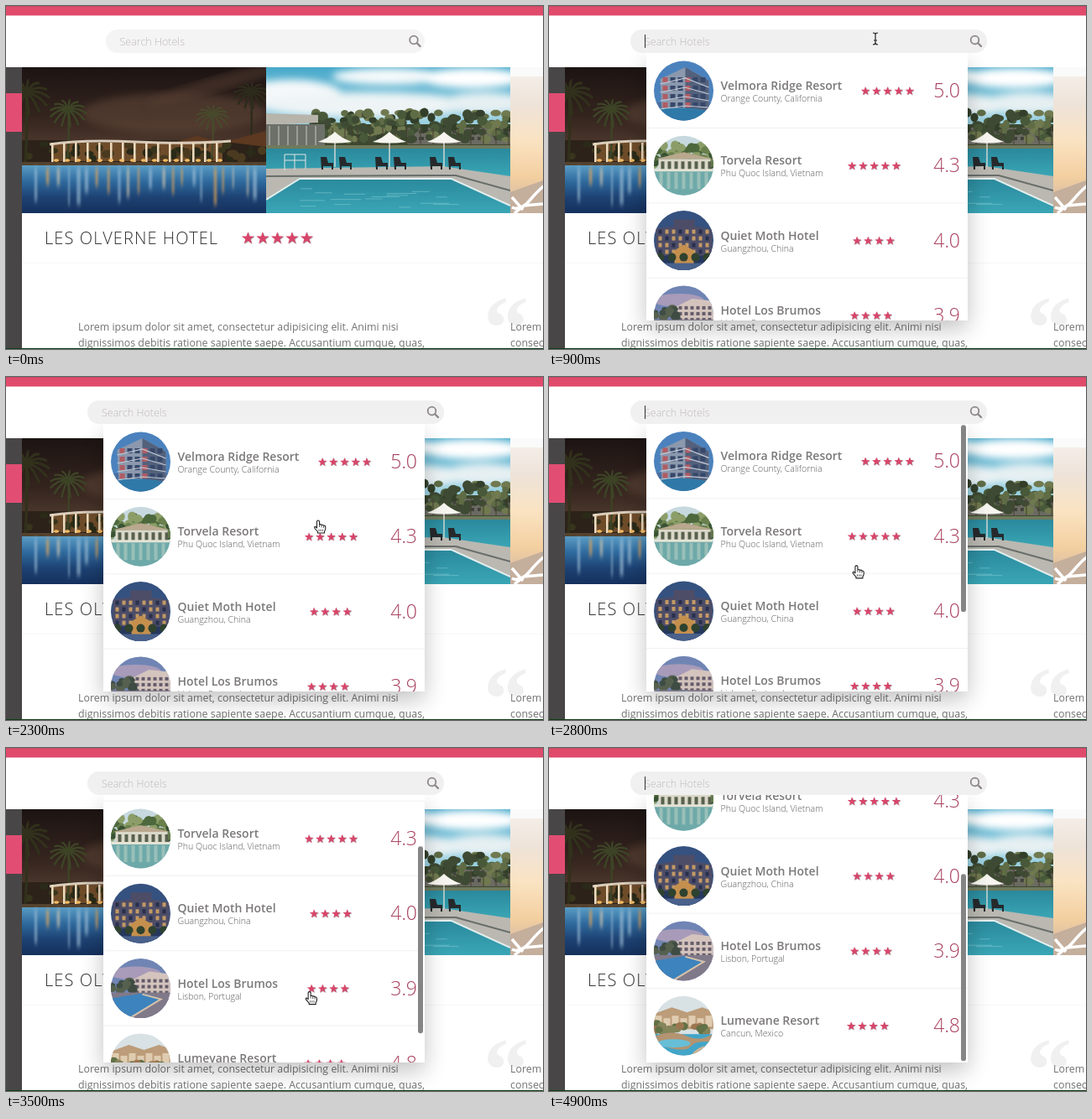
An HTML page that plays this animation: 640x409 px, repeating every 5 s.

```html
<!DOCTYPE html>
<html lang="en">
<head>
<meta charset="utf-8">
<title>Hotel search</title>
<style>
html, body { margin: 0; width: 100%; height: 100%; overflow: hidden; background: #fff; }
svg { display: block; width: 100%; height: 100%; font-family: "Open Sans", "Noto Sans", sans-serif; }
.light { font-weight: 300; }
.title { font-size: 14px; font-weight: 600; fill: #7b7879; }
.place { font-size: 10.6px; font-weight: 300; fill: #5f5c5d; }
.score { font-size: 23px; font-weight: 300; fill: #a83f5e; text-anchor: end; }
.body { font-size: 12.4px; fill: #737172; }
.quote { font: bold 108px "Liberation Serif", serif; fill: #f1f0f1; }
</style>
</head>
<body>
<svg id="stage" viewBox="0 0 640 409"></svg>
<script>
const R = (x, y, w, h, fill, more = '') => `<rect x="${x}" y="${y}" width="${w}" height="${h}" fill="${fill}" ${more}/>`;
const E = (x, y, rx, ry, fill, more = '') => `<ellipse cx="${x}" cy="${y}" rx="${rx}" ry="${ry}" fill="${fill}" ${more}/>`;
const P = (d, fill, more = '') => `<path d="${d}" fill="${fill}" ${more}/>`;
const L = (d, color, w = 1, more = '') => `<path d="${d}" fill="none" stroke="${color}" stroke-width="${w}" ${more}/>`;
const T = (x, y, cls, text, more = '') => `<text x="${x}" y="${y}" class="${cls}" ${more}>${text}</text>`;
const rep = (n, f) => Array.from({ length: n }, (_, i) => f(i)).join('');
const grad = (id, ...colors) => `<linearGradient id="${id}" x2="0" y2="1">${
  colors.map((c, i) => `<stop offset="${i / (colors.length - 1)}" stop-color="${c}"/>`).join('')}</linearGradient>`;
const clip = (id, shape) => `<clipPath id="${id}">${shape}</clipPath>`;

let seed = 7;
const rnd = (a, b) => a + (b - a) * ((seed = (seed * 16807) % 2147483647) / 2147483647);
const pick = list => list[Math.floor(rnd(0, list.length))];

function star(cx, cy, r, fill) {
  const pts = rep(10, i => {
    const a = i * Math.PI / 5, q = i % 2 ? r * .4 : r;
    return `${(cx + q * Math.sin(a)).toFixed(1)},${(cy - q * Math.cos(a)).toFixed(1)} `;
  });
  return `<polygon points="${pts}" fill="${fill}"/>`;
}
const stars = (n, x, y, r, step) => rep(n, i =>
  star(x + i * step + .8, y + .6, r, '#a99aa0') + star(x + i * step, y, r, '#d9456a'));

function palm(x, y, r, ground, color) {
  return L(`M${x} ${y}Q${x + 2} ${(y + ground) / 2} ${x - 1} ${ground}`, color, r / 9) + rep(13, i => {
    const a = i * Math.PI * 2 / 13, ex = x + r * Math.cos(a), ey = y + r * (.75 * Math.sin(a) + .2);
    return L(`M${x} ${y}Q${(x + ex) / 2} ${(y + ey) / 2 - r * .3} ${ex} ${ey}`, color, r / 9);
  });
}
const foliage = (n, x0, x1, y0, y1, size, colors) => rep(n, () =>
  E(rnd(x0, x1), rnd(y0, y1), rnd(.6, 1) * size, rnd(.5, .9) * size, pick(colors)));

function nightPool() {
  return R(19, 73, 291, 174, 'url(#night)') +
    E(200, 128, 110, 24, '#6d5140', 'opacity=".45" filter="url(#soft)"') +
    E(255, 92, 90, 9, '#5a4035', 'opacity=".5" filter="url(#soft)" transform="rotate(-16 255 92)"') +
    R(19, 160, 291, 30, '#2c2219') + R(54, 163, 204, 22, '#8a5f33', 'opacity=".7"') +
    foliage(40, 19, 310, 164, 182, 7, ['#2a2a18', '#38351d', '#4a3a20']) +
    palm(74, 124, 22, 185, '#3d4426') + palm(246, 130, 20, 183, '#48492c') +
    palm(292, 103, 21, 180, '#2d2c1c') + palm(24, 104, 28, 186, '#31311c') +
    P('M200 163L228 155L256 163ZM262 162L310 149V168Z', '#5c3920') +
    L('M52 165Q90 159 155 162T268 161', '#d9cbb9', 3) +
    rep(15, i => R(54 + i * 14, 163, 2.6, 23, '#ecd9bd')) +
    rep(16, i => E(60 + i * 13, 184, 3, 1.8, '#f2b860')) +
    R(19, 186, 291, 4, '#54422e') + R(19, 190, 291, 57, 'url(#water)') +
    '<g filter="url(#blurY)">' + rep(22, i =>
      R(34 + i * 12.5 + rnd(-3, 3), 193, rnd(2, 5), rnd(20, 46), pick(['#e8a656', '#d6c8ae', '#9fc0d8']), 'opacity=".6"')) + '</g>';
}

function dayPool() {
  return R(310, 73, 291, 174, 'url(#day)') +
    '<g filter="url(#soft)">' + E(455, 84, 66, 10, '#f6fafb') + E(340, 106, 60, 18, '#f4f8f9') +
    E(555, 86, 60, 12, '#fff') + E(430, 118, 130, 15, '#eef4f6') + E(570, 116, 50, 13, '#e6f0f3') + '</g>' +
    R(370, 141, 231, 29, '#3d472f') + R(478, 145, 123, 20, '#6b6a62') +
    rep(12, i => R(482 + i * 10, 148, 6, 4, '#45473f') + R(482 + i * 10, 156, 6, 4, '#3f423b')) +
    foliage(190, 366, 601, 127, 160, 6.5, ['#48593a', '#5f6c45', '#333f2a', '#70794f', '#3e4a33']) +
    rep(16, i => L(`M${374 + i * 15} 145v23`, '#4b4736', 1.2)) +
    P('M310 128L372 130V139L310 142Z', '#b7b4ac') + R(310, 141, 70, 27, '#6c7069') +
    rep(6, i => R(313 + i * 11, 143, 2, 24, '#9a9d96')) +
    R(310, 166, 291, 5, '#6f7a5c') + R(310, 170, 291, 34, 'url(#teal)') +
    P('M310 194L520 191L601 203V247H310Z', '#bab8b1') +
    L('M310 203L536 202L601 220', '#686e6a', 2) +
    P('M310 230L350 205H531L601 238V247H310Z', 'url(#teal)') +
    L('M310 231L350 206H531L601 238', '#e5efee', 2) +
    L('M332 196V177H357V194M332 184H357M344 177V195', '#dfe5e3', 1) +
    [392, 457, 522].map(x => L(`M${x} 160V192`, '#e7e5df', 1.3) +
      P(`M${x - 20} 162Q${x - 7} 157 ${x} 150Q${x + 7} 157 ${x + 20} 162Q${x} 165 ${x - 20} 162Z`, '#f7f5ef') +
      [-13, 9].map(d => P(`M${x + d - 4} 180h7l2 7h6v8h-2v-4h-10v4h-2Z`, '#26292c')).join('')).join('') +
    rep(16, () => R(rnd(350, 520), rnd(212, 244), rnd(12, 40), 1, '#a0dce2', 'opacity=".4"'));
}

function sunsetDeck() {
  return R(601, 73, 39, 174, 'url(#peach)') + R(601, 73, 39, 11, '#fbfafa') +
    P('M601 222L640 208V247H601Z', '#c4ae9c') +
    L('M603 240Q613 245 624 232T642 214M606 247L617 238L640 236M603 228L616 243', '#fff', 3.5);
}

// Round thumbnails, centred on 0,0
const thumbs = [
  R(-36, -36, 72, 72, '#4b82bd') + R(-36, 14, 72, 22, '#4b6f9e') + P('M-28 -14L2 -28L30 -12V23L-26 24Z', '#8b98ad') +
    P('M2 -28L30 -12V23L2 24Z', '#53617c') +
    rep(24, i => R(-25 + i % 6 * 9, -16 + Math.floor(i / 6) * 10, 6, 6, i % 3 ? '#37486a' : '#b15c63')) +
    rep(4, i => L(`M-28 ${-8 + i * 10}L2 ${-15 + i * 11}L30 ${-4 + i * 8}`, '#c3c9d6', 1.2)) + P('M-36 24Q0 16 36 26V36H-36Z', '#2f79a9'),
  R(-36, -36, 72, 72, '#c7d9df') + foliage(70, -36, 36, -26, 2, 7, ['#4d683c', '#69804d', '#8c9d68', '#385234']) +
    R(-30, -8, 62, 13, '#dad8c9') + P('M-33 -8L0 -16L35 -8Z', '#b9a88e') +
    rep(8, i => R(-27 + i * 8, -5, 4, 10, '#59614e')) + R(-36, 5, 72, 32, '#6ea9a9') +
    rep(7, i => R(-29 + i * 9, 8, 4, 20, '#b6cfc4', 'opacity=".6"')) + R(-36, 4, 72, 3, '#e4e4d6'),
  R(-36, -36, 72, 72, '#35517f') + P('M-33 -14L-12 -17V-25H13V-17L34 -13V22H-33Z', '#4d4d68') +
    rep(32, i => R(-30 + i % 8 * 8, -13 + Math.floor(i / 8) * 8, 4, 5, i % 3 ? '#c39a65' : '#28304d')) +
    R(-36, 18, 72, 18, '#26385e') + P('M-11 30V12L0 5L12 12V30Z', '#c58f4d') + R(-36, 27, 72, 10, '#49618b') +
    rep(5, i => E(-28 + i * 14, 20, 5, 5, '#2f422f')),
  R(-36, -36, 72, 72, '#7085b4') + E(-6, -18, 30, 8, '#a89bb9') + P('M-10 -10L10 -20L36 -17V12H-10Z', '#d4c4bd') +
    rep(18, i => R(-6 + i % 6 * 7, -11 + Math.floor(i / 6) * 7, 4, 4, '#655c6b')) +
    foliage(14, -36, -8, -10, 4, 6, ['#3e4c43', '#56604e']) + R(-36, 5, 72, 32, '#807989') +
    P('M-36 12L2 6L24 12L-14 36H-36Z', '#3d83bd') + L('M2 7L24 13L-14 36', '#d8c2a9', 2),
  R(-36, -36, 72, 72, '#d8e1e4') + P('M-36 -14L-14 -22L4 -16L22 -22L36 -17V4H-36Z', '#bc9c79') +
    rep(7, i => R(-34 + i * 10, -12 + i % 2 * 3, 8, 13, '#dfccb0')) +
    foliage(24, -36, 36, -2, 9, 6, ['#627146', '#84855a', '#9c7650']) + R(-36, 10, 72, 26, '#43a5c8') +
    P('M-36 13Q-14 4 3 12T36 9V20Q16 16 8 25T-36 20Z', '#b49471') + E(-12, 21, 20, 5, '#67bfd7') + P('M8 36Q20 20 36 25V36Z', '#d0b492')
];

const hotels = [
  ['Velmora Ridge Resort', 'Orange County, California', 5, 372, '5.0'],
  ['Torvela Resort', 'Phu Quoc Island, Vietnam', 5, 356, '4.3'],
  ['Quiet Moth Hotel', 'Guangzhou, China', 4, 362, '4.0'],
  ['Hotel Los Brumos', 'Lisbon, Portugal', 4, 359, '3.9'],
  ['Lumevane Resort', 'Cancun, Mexico', 4, 355, '4.8']
];
const rowStep = 89.3;
const row = ([name, place, n, x, score], i) => `<g transform="translate(0 ${i * rowStep})">` +
  `<g transform="translate(160.5 101)"><g clip-path="url(#round)">${thumbs[i]}</g></g>` +
  T(204.5, 100, 'title', name) + T(204.5, 114, 'place', place) +
  stars(n, x + 5, 101.5, 5.5, 13.2) + T(490, 109, 'score', score) + R(116, 145, 383, 1, '#f2f1f2') + '</g>';

const stage = document.getElementById('stage');
stage.innerHTML = '<defs>' +
  grad('night', '#1c1413', '#34241e', '#5d4536', '#33261f') + grad('water', '#5a9cc4', '#2f6a9e', '#1d4273', '#15305c') +
  grad('day', '#48a9cb', '#8ecbdd', '#dfedf0', '#dfedf0') + grad('teal', '#2a899c', '#3aa6b6') +
  grad('peach', '#f6f1ec', '#eee3d9', '#fae3c2', '#f3cfa0', '#c9b3a6') +
  clip('night-box', R(19, 73, 291, 174, '')) + clip('day-box', R(310, 73, 291, 174, '')) +
  clip('deck-box', R(601, 73, 39, 174, '')) + clip('list-box', R(116, 56, 383, 319, '', 'id="listBox"')) +
  clip('round', '<circle r="35.5"/>') +
  '<filter id="soft"><feGaussianBlur stdDeviation="5"/></filter>' +
  '<filter id="blurY"><feGaussianBlur stdDeviation="1 3"/></filter>' +
  '<filter id="shade" x="-30%" y="-30%" width="160%" height="160%"><feGaussianBlur stdDeviation="14"/></filter></defs>' +
  R(0, 0, 640, 409, '#fff') +
  `<g clip-path="url(#night-box)">${nightPool()}</g><g clip-path="url(#day-box)">${dayPool()}</g>` +
  `<g clip-path="url(#deck-box)">${sunsetDeck()}</g>` +
  R(0, 73, 19, 336, '#484647') + R(0, 104, 19, 46, '#e24d73') +
  T(46, 284, 'light', 'LES OLVERNE HOTEL', 'font-size="20" letter-spacing="1.1" fill="#343233"') +
  stars(5, 288.3, 277, 7.8, 17.5) + R(20, 306, 620, 1, '#f8f7f8') +
  T(569, 420, 'quote', '“') +
  T(86, 387, 'body', 'Lorem ipsum dolor sit amet, consectetur adipisicing elit. Animi nisi') +
  T(86, 406, 'body', 'dignissimos debitis ratione sapiente saepe. Accusantium cumque, quas,') +
  T(601, 387, 'body', 'Lorem ipsum') + T(601, 406, 'body', 'consectetur') +
  R(116, 70, 383, 315, '#000', 'id="shadow" filter="url(#shade)"') +
  R(0, 11, 640, 45, '#fff') +
  `<g id="menu" clip-path="url(#list-box)">${R(116, 56, 383, 319, '#fff')}<g id="list">${hotels.map(row).join('')}</g>` +
  R(491, 57, 6, 223, '#868586', 'rx="3" id="thumb"') + '</g>' +
  R(119, 28, 380, 28, '#f5f4f5', 'rx="14" id="field"') +
  T(0, 47, 'light', 'Search Hotels', 'id="hint" font-size="12.5" fill="#bdb9bb"') +
  R(114, 34, 1, 16, '#333', 'id="caret"') +
  `<g id="lens">${L('M4 4L7.5 7.5', '#8d878a', 2.4, 'stroke-linecap="round"')}<circle r="4.8" fill="none" stroke="#8d878a" stroke-width="1.8"/></g>` +
  R(0, 0, 640, 11.4, '#e04b6c') + R(0, 0, 640, .6, '#b54a63') + R(0, 408, 640, 1, '#0d3c14') +
  `<g id="beam">${L('M-3 -7Q0 -7 0 -5V5Q0 7 -3 7M3 -7Q0 -7 0 -5V5Q0 7 3 7M-2 2H2', '#222', 1.2)}</g>` +
  `<g id="hand">${P('M-1.5 1Q0 -1 1.5 1V5Q3 4 4 5.5Q5.5 4.8 6.5 6.2Q8.6 5.8 8.8 8V10Q8.4 12 7.5 13V15H-.5V13.5L-4 9.5Q-5 7.5 -3.2 7.4L-1.5 9Z', '#fff', 'stroke="#222" stroke-width="1.1" stroke-linejoin="round"')}${L('M1.5 5V8M4 6V8.5M6.5 6.5V9M1 10.5V13M3.2 10.5V13M5.4 10.5V13', '#333', .8)}</g>`;

const $ = id => document.getElementById(id);
const set = (id, attrs) => { for (const k in attrs) $(id).setAttribute(k, attrs[k]); };
const show = (id, on) => set(id, { visibility: on ? 'visible' : 'hidden' });
const ease = (t, a, b) => {
  const k = Math.min(1, Math.max(0, (t - a) / (b - a)));
  return k * k * (3 - 2 * k);
};
function along(keys, t, col) {
  let i = 1;
  while (i < keys.length - 1 && t > keys[i][0]) i++;
  const [a, b] = [keys[i - 1], keys[i]];
  const k = Math.min(1, Math.max(0, (t - a[0]) / (b[0] - a[0])));
  return a[col] + (b[col] - a[col]) * k;
}

// time, x, y: a steady drift down through the list and off the stage
const pointer = [[200, 392, -10], [500, 389, 39], [900, 389, 39], [1600, 380, 90],
  [2300, 372, 171], [3200, 362, 268], [4100, 361, 336], [4800, 361, 412]];
const scrollStart = 2750, scrollEnd = 4000, focusTime = 750;

function draw(t) {
  const wide = ease(t, 500, 800), open = ease(t, 550, 900);
  set('field', { x: 119 - 22 * wide, width: 380 + 45 * wide, fill: wide > .5 ? '#f1f0f1' : '#f5f4f5' });
  set('hint', { x: 135.5 - 21.5 * wide });
  set('lens', { transform: `translate(${486 + 21.5 * wide} 40.5)` });
  show('caret', t >= focusTime && (t - focusTime) % 1000 < 500);

  set('listBox', { height: 319 * open });
  set('menu', { opacity: open });
  set('shadow', { height: 315 * open, opacity: .24 * open });
  const offset = 127 * ease(t, scrollStart, scrollEnd);
  set('list', { transform: `translate(0 ${-offset})` });
  set('thumb', { y: 56.8 + offset * .735 });
  show('thumb', t >= scrollStart);

  const x = along(pointer, t, 1), y = along(pointer, t, 2);
  for (const id of ['beam', 'hand']) set(id, { transform: `translate(${x} ${y})` });
  show('beam', y < 56);
  show('hand', y >= 56);
}

const start = performance.now();
function tick(now) {
  const t = Math.max(0, now - start) % 5000;
  draw(Math.floor(t / 100) * 100);
  requestAnimationFrame(tick);
}
draw(0);
requestAnimationFrame(tick);
</script>
</body>
</html>
```
